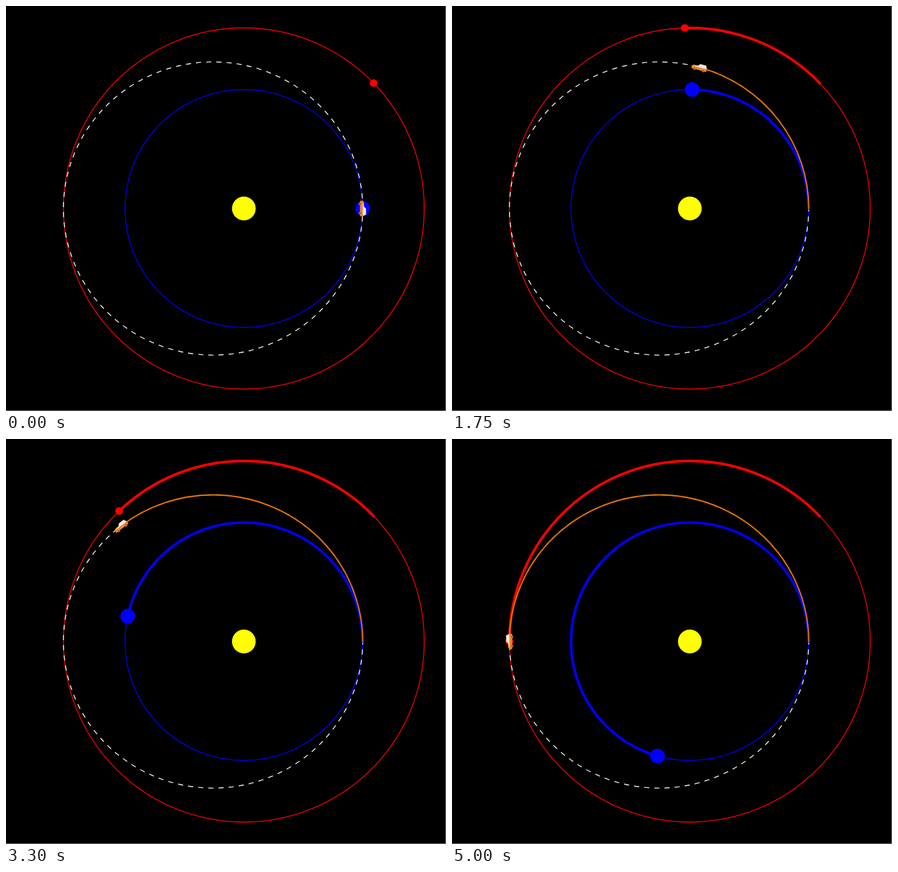
Animation, 720 px wide and 662 px high, one loop 5.05 s. Source, as an HTML page with a canvas:

```html
<!DOCTYPE html>
<html lang="en">
<head>
<meta charset="utf-8">
<title>Transfer orbit</title>
<style>
  html, body { margin: 0; width: 100%; height: 100%; overflow: hidden; background: #000; }
  canvas { display: block; }
</style>
</head>
<body>
<canvas id="stage" width="720" height="662"></canvas>
<script>
const ctx = document.getElementById('stage').getContext('2d');
const TAU = 2 * Math.PI, RAD = Math.PI / 180;
const STEPS = 100, STEP_MS = 50;
const PT = 100 / 72; // line weights and dashes are set in points at 100 dpi
const sun = { x: 389.2, y: 331 };
const inner = { r: 194.5, start: 0, sweep: 254.2 * RAD, color: '#00f', size: 12 };
const outer = { r: 295.2, start: 44 * RAD, sweep: 136 * RAD, color: '#f00', size: 6.25 };

// Transfer ellipse with the sun at its right focus
const a = (inner.r + outer.r) / 2;
const b = Math.sqrt(inner.r * outer.r);
const e = (outer.r - inner.r) / (outer.r + inner.r);
const middle = sun.x - a * e;

function eccentricAnomaly(mean) {
  let E = mean;
  for (let i = 0; i < 8; i++) E -= (E - e * Math.sin(E) - mean) / (1 - e * Math.cos(E));
  return E;
}

function disc(x, y, r, color) {
  ctx.fillStyle = color;
  ctx.beginPath();
  ctx.arc(x, y, r, 0, TAU);
  ctx.fill();
}

// Counter-clockwise elliptic arc; angles grow upwards from the right
function arc(x, rx, ry, from, to, color, width, dash = []) {
  ctx.strokeStyle = color;
  ctx.lineWidth = width * PT;
  ctx.lineCap = dash.length ? 'butt' : 'square';
  ctx.setLineDash(dash.map(length => length * PT));
  ctx.beginPath();
  ctx.ellipse(x, sun.y, rx, ry, 0, -from, -to, true);
  ctx.stroke();
}

const orbit = p => arc(sun.x, p.r, p.r, 0, TAU, p.color, 1);

function trail(p, progress) {
  if (progress) arc(sun.x, p.r, p.r, p.start, p.start + p.sweep * progress, p.color, 3);
}

function planet(p, progress) {
  const angle = p.start + p.sweep * progress;
  disc(sun.x + p.r * Math.cos(angle), sun.y - p.r * Math.sin(angle), p.size, p.color);
}

function polygon(color, ...points) {
  ctx.fillStyle = color;
  ctx.beginPath();
  points.forEach(([x, y]) => ctx.lineTo(x, y));
  ctx.fill();
}

// Small car facing left
function car(E) {
  ctx.save();
  ctx.translate(middle + a * Math.cos(E), sun.y - b * Math.sin(E));
  ctx.rotate(Math.atan2(b * Math.cos(E), a * Math.sin(E)));
  polygon('#ee8420', [-13, 0], [-10, -2], [12, -2], [13, 0], [12.5, 4.5], [-12.5, 4.5]);
  polygon('#f4e4dc', [-10, -0.5], [-3, -2], [0, -5.5], [10, -5.5], [12, -1], [9, 0], [-9, 0]);
  for (const x of [-7.5, 7.5]) {
    disc(x, 4, 2.2, '#e08a3c');
    disc(x, 4, 1, '#5a3418');
  }
  ctx.restore();
}

function draw(step) {
  const progress = step / STEPS;
  const E = eccentricAnomaly(Math.PI * progress);
  ctx.fillStyle = '#777';
  ctx.fillRect(0, 0, 720, 662);
  ctx.fillStyle = '#000';
  ctx.fillRect(0, 0, 719, 661);

  disc(sun.x, sun.y, 19.4, '#ff0');
  orbit(inner);
  orbit(outer);
  arc(middle, a, b, 0, TAU, '#fff', 1, [6, 6]);
  trail(inner, progress);
  trail(outer, progress);
  planet(inner, progress);
  planet(outer, progress);
  if (step) arc(middle, a, b, 0, E, '#e67300', 1.5);
  car(E);
}

function tick() {
  draw(Math.floor(performance.now() / STEP_MS) % (STEPS + 1));
  requestAnimationFrame(tick);
}
tick();
</script>
</body>
</html>
```
